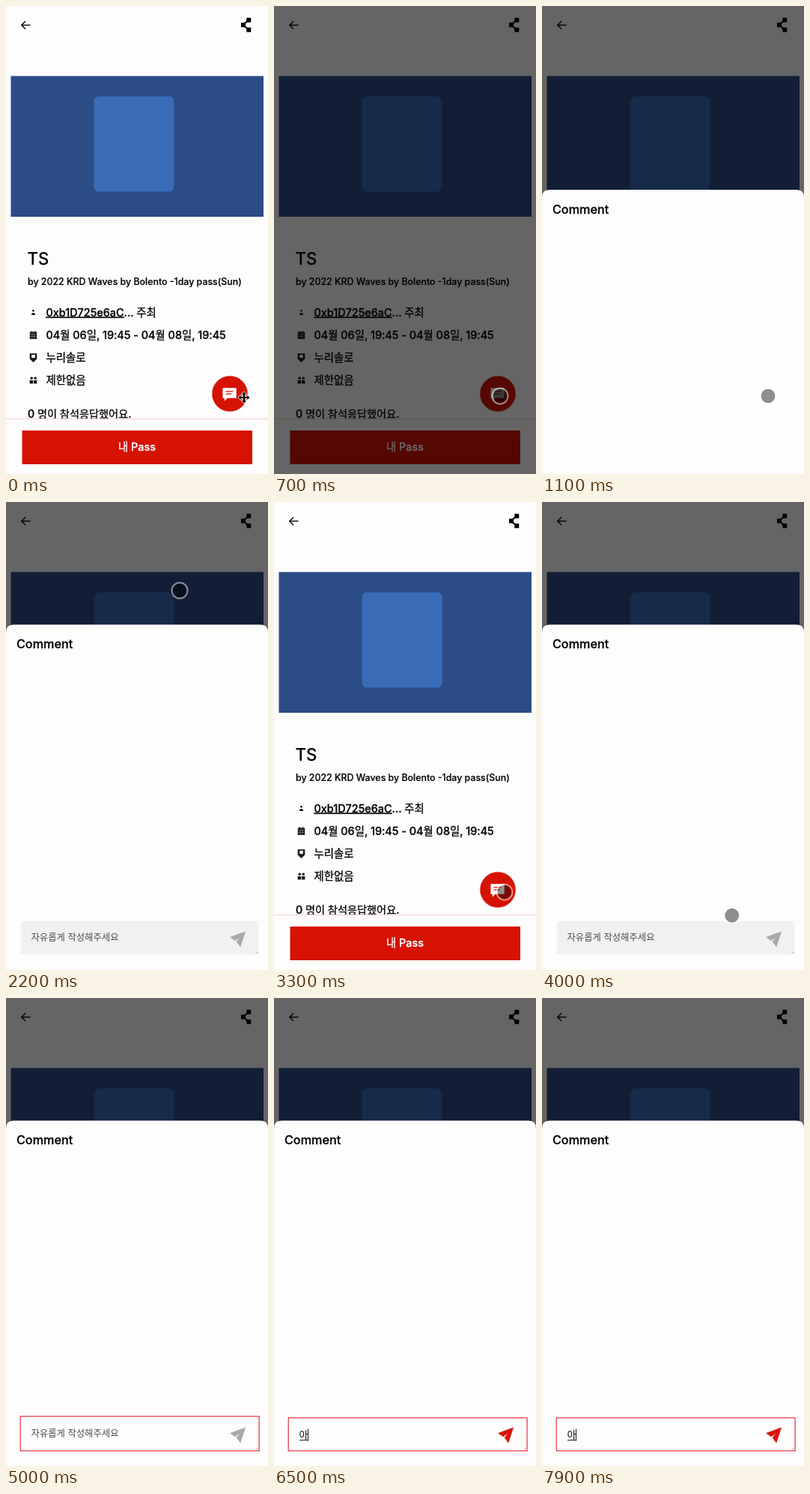
Recreate the animation shown at these times as an HTML page. Size 350x624 px, loop 8000 ms.

```html
<!DOCTYPE html>
<html lang="ko">
<head>
<meta charset="utf-8">
<title>Comment sheet</title>
<style>
html, body { margin: 0; width: 100%; height: 100%; overflow: hidden; background: #fdfdfd; }
svg { display: block; width: 350px; height: 624px; }
text {
  font-family: Inter, "Noto Sans CJK KR", "Noto Sans CJK", sans-serif;
  font-size: 14.4px; font-weight: 500; white-space: pre;
  color: #050505; fill: currentColor; stroke: currentColor; stroke-width: .3px;
}
.thin { font-weight: 400; stroke: none; }
</style>
</head>
<body>
<svg viewBox="0 0 350 624">
  <rect width="350" height="624" fill="#fdfdfd"/>

  <g id="page">
    <path d="M32.5 25.5H21M26 20.3L20.8 25.5L26 30.7" fill="none" stroke="#111" stroke-width="1.6"/>
    <path d="M324 18.5L317 25.3L324 32" fill="none" stroke="#000" stroke-width="2"/>
    <path d="M321.3 15.7h6v6h-6zM314 22.3h6v6h-6zM321.3 28.8h6v6h-6z"/>

    <rect x="6.5" y="93.4" width="337.5" height="187.6" fill="#2b4c86"/>
    <rect x="117.5" y="120.5" width="107" height="127" rx="7" fill="#3a6bb7"/>

    <text x="28.5" y="345.3" style="font-size:22.2px;stroke-width:.15px">TS</text>
    <text x="29" y="372" style="font-size:12.4px;stroke-width:.2px">by 2022 KRD Waves by Bolento -1day pass(Sun)</text>

    <text x="53.5" y="413.5"><tspan text-decoration="underline">0xb1D725e6aC</tspan>... 주최</text>
    <text x="53.5" y="443.5">04월 06일, 19:45 - 04월 08일, 19:45</text>
    <text x="53.5" y="473.5">누리솔로</text>
    <text x="53.5" y="503.5">제한없음</text>
    <text x="29" y="548.5" style="font-size:14.2px">0 명이 참석응답했어요.</text>

    <g fill="#181818">
      <circle cx="36.5" cy="406.3" r="1.4"/>
      <path d="M34 412v-1.5q2.5-3 5 0v1.5z"/>
      <path d="M31.8 434.5h2v-1.3h1.2v1.3h3v-1.3h1.2v1.3h2v9.5h-9.4z"/>
      <path d="M32.5 437.3h8M32.5 440.5h8M35 437v6.5M38 437v6.5" stroke="#999" stroke-width=".6"/>
      <path d="M31.7 463.2h9.6v7.3l-4.8 4.8l-4.8-4.8z"/>
      <rect x="34.2" y="465" width="4.6" height="4.2" fill="#fdfdfd"/>
      <circle cx="34.2" cy="496.2" r="1.8"/>
      <circle cx="39.2" cy="496.2" r="1.8"/>
      <path d="M31.7 499h4.4v4.5h-4.4zM37 499h4.4v4.5h-4.4z"/>
    </g>

    <rect y="550" width="350" height="74" fill="#fdfdfd"/>
    <path d="M0 550.5H350" stroke="#fbcfcb"/>
    <rect x="21.5" y="566" width="307.5" height="45" fill="#d61203"/>
    <text x="175" y="593" text-anchor="middle" style="color:#fff">내 Pass</text>

    <circle cx="299" cy="517" r="23.8" fill="#d61203" stroke="#e58a83" stroke-width=".6"/>
    <path d="M289.5 509.3h18.3v13.4h-12l-4 4v-4h-2.3z" fill="#fff"/>
    <path d="M293.5 513.8h10M293.5 517.2h8" stroke="#d61203" stroke-width="1.3"/>
  </g>

  <rect id="dim" width="350" height="624" fill="#000" opacity=".6"/>

  <g id="sheet">
    <path d="M0 640V173.5Q0 163.5 10 163.5H340Q350 163.5 350 173.5V640z" fill="#fdfdfd"/>
    <text x="14" y="195" style="font-size:16.2px">Comment</text>
    <rect id="field"/>
    <text id="hint" class="thin" x="33.5" style="font-size:12.35px;color:#4c4c4c">자유롭게 작성해주세요</text>
    <text id="typed" class="thin" x="33.5" y="587" style="font-size:13px"></text>
    <path id="under" d="M34 589.5h12" stroke="#222"/>
    <path id="caret" stroke="#111"/>
    <path id="send" d="M319.5 573L299.8 580.3L306.3 584.8L313.5 579.3L308.3 586.3L313 592.8z" stroke-width=".8" stroke-linejoin="round"/>
    <path d="M333.5 602.2l3-3M335.6 602.3l1-1" stroke="#888" stroke-width=".7"/>
  </g>

  <g id="touch">
    <circle r="9.5" fill="#000" fill-opacity=".44"/>
    <circle r="10.5" fill="none" stroke="#fff" stroke-opacity=".5" stroke-width="2"/>
  </g>
  <path id="move" transform="translate(318 522)" stroke="#fff" stroke-width="1.4" paint-order="stroke" stroke-linejoin="round"
    d="M0-7.5L3-4.3H1V-1H4.3V-3L7.5 0L4.3 3V1H1V4.3H3L0 7.5L-3 4.3H-1V1H-4.3V3L-7.5 0L-4.3-3V-1H-1V-4.3H-3z"/>
</svg>

<script>
const LOOP = 8000, STEP = 100, RISE = 362;
const el = id => document.getElementById(id);
const set = (id, attrs) => { for (const k in attrs) el(id).setAttribute(k, attrs[k]); };
const show = (id, on) => set(id, { visibility: on ? "visible" : "hidden" });
const within = (t, ...spans) => spans.some(([a, b]) => t >= a && t < b);
const ramp = (t, a, b) => Math.min(1, Math.max(0, (t - a) / (b - a)));
const ease = u => u * u * (3 - 2 * u);
const lerp = (a, b, u) => a + (b - a) * u;
const mix = (a, b, u) => `rgb(${a.map((v, i) => Math.round(lerp(v, b[i], u)))})`;

// time, x, y
const path = [
  [100, 317, 522], [500, 302, 520], [1600, 302, 520], [2200, 232, 118],
  [2400, 232, 118], [3200, 308, 520], [3700, 307.5, 521.5], [4300, 200, 581]
];

function pointer(t) {
  const i = path.findIndex(p => p[0] > t);
  if (i < 0) return path[path.length - 1].slice(1);
  if (i === 0) return path[0].slice(1);
  const a = path[i - 1], b = path[i], u = ease(ramp(t, a[0], b[0]));
  return [lerp(a[1], b[1], u), lerp(a[2], b[2], u)];
}

function drawField(t) {
  const focus = ramp(t, 4400, 4700), settle = ramp(t, 6100, 6400);
  const top = lerp(lerp(559, 557.8, focus), 559.8, settle);
  const bottom = lerp(603, 603.8, focus), left = lerp(20, 19.2, focus);
  set("field", {
    x: left, y: top, width: 357.3 - 2 * left, height: bottom - top,
    fill: mix([241, 241, 241], [253, 253, 253], focus),
    stroke: "#e5323f", "stroke-width": 1.2, "stroke-opacity": focus
  });

  const word = within(t, [6200, 6400]) ? "ㅇ" : within(t, [6400, 7000], [7800, LOOP]) ? "아" : "";
  const shift = t >= 6200 ? 2 : 0;
  el("typed").textContent = word;
  show("under", word);
  show("hint", !word);
  set("hint", { y: 585 + shift });

  show("caret", within(t, [5500, 6000], [6200, 6800], [7000, 7400], [7800, LOOP]));
  set("caret", {
    d: `M${word ? 45.5 : 34.5} ${572.5 + shift}v16`,
    opacity: lerp(.5, 1, ramp(t, 5500, 5600))
  });

  const hot = ramp(t, 6100, 6300) - ramp(t, 6900, 7100) + ramp(t, 7700, 7900);
  const color = mix([169, 169, 169], [216, 18, 10], hot);
  set("send", { fill: color, stroke: color });
}

function draw(t) {
  show("dim", within(t, [700, 2400], [3400, LOOP]));

  const start = t < 2400 ? 835 : 3535;
  const open = within(t, [835, 2400], [3535, LOOP]);
  el("sheet").style.display = open ? "" : "none";
  set("sheet", { transform: `translate(0 ${461 * (1 - ease(ramp(t, start, start + RISE)))})` });
  drawField(t);

  const [x, y] = pointer(t);
  show("move", t < 100);
  show("touch", t >= 100);
  set("touch", { transform: `translate(${x} ${y})`, opacity: 1 - ramp(t, 4600, 5000) });
}

const origin = performance.now();
function tick() {
  const t = (performance.now() - origin) % LOOP;
  draw(Math.floor(t / STEP) * STEP);
  requestAnimationFrame(tick);
}
tick();
</script>
</body>
</html>
```
